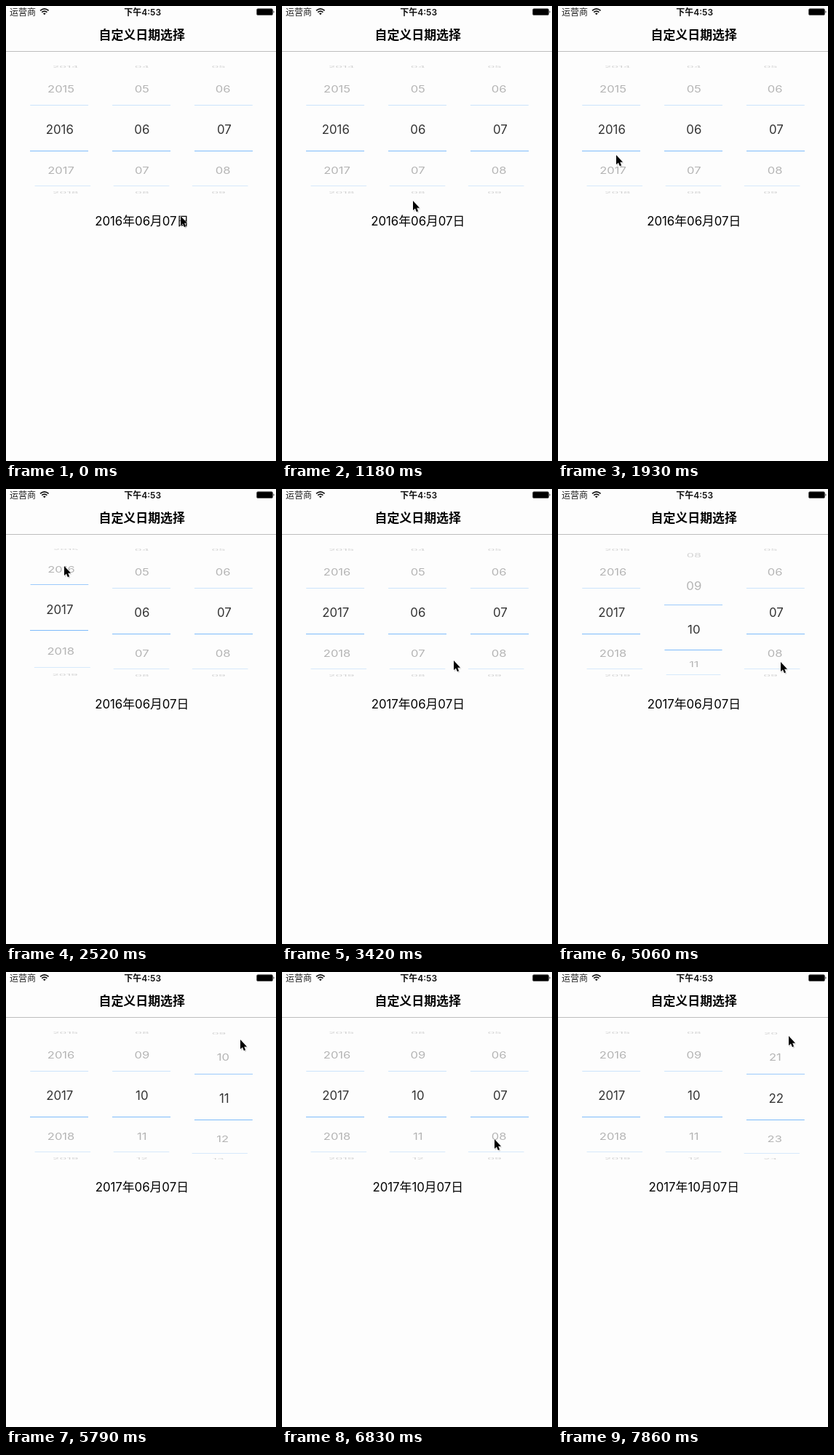
An HTML page that plays this animation: 371x626 px, repeating every 8 s.

```html
<!DOCTYPE html>
<html lang="zh-CN">
<head>
<meta charset="utf-8">
<title>自定义日期选择</title>
<style>
  html, body { margin: 0; width: 100%; height: 100%; overflow: hidden; background: #fdfdfd; }
  svg { display: block; width: 371px; height: 626px; }
  text { font-family: Inter, "Noto Sans CJK SC", "Noto Sans CJK", sans-serif; text-anchor: middle; }
</style>
</head>
<body>
<svg viewBox="0 0 371 626">
  <defs><clipPath id="wheelClip"><rect x="0" y="82" width="371" height="176"/></clipPath></defs>
  <rect width="371" height="626" fill="#fdfdfd"/>

  <text x="23" y="12.5" font-size="12" fill="#222">运营商</text>
  <g fill="none" stroke="#111" stroke-width="1.7">
    <path d="M47 6.3Q52.8 1.3 58.6 6.3"/>
    <path d="M49.2 8.7Q52.8 5.6 56.4 8.7"/>
  </g>
  <path d="M50.9 10.2Q52.8 8.7 54.7 10.2L52.8 12.3Z" fill="#111"/>
  <text x="187.7" y="12.5" font-size="12" font-weight="600" fill="#111">下午4:53</text>
  <rect x="344.5" y="3.800" width="22" height="8.700" rx="1.6" fill="#000" stroke="#555" stroke-width=".8"/>
  <path d="M367.500 6.2Q369.500 8 367.500 9.8Z" fill="#111"/>

  <text x="186.7" y="46.3" font-size="16.9" font-weight="700" fill="#000">自定义日期选择</text>
  <rect y="62" width="371" height="1" fill="#bdbdbd"/>

  <g id="wheels" clip-path="url(#wheelClip)"></g>
  <text id="date" x="186.8" y="302" font-size="16.8" fill="#000"></text>

  <g id="cursor">
    <path d="M1 2V15.500L4.200 12.500 6 17 8.500 16 6.800 11.500H10.500Z" fill="#000" opacity=".15"/>
    <path d="M0 0V13L3 10.400 4.900 15.200 7 14.300 5.200 9.700H9Z" fill="#000"
          stroke="#fff" stroke-width="1" paint-order="stroke"/>
  </g>
</svg>
<script>
const LOOP = 8000, STEP = 148.3, LAST = 53;
const MID_X = 186, MID_Y = 170, RADIUS = 87.5;
const YEAR_SET = 20, MONTH_SET = 41;

const clamp = t => Math.min(1, Math.max(0, t));
const smooth = t => t * t * (3 - 2 * t);
const glide = t => 1 - (1 - t) ** 2.3;
const spring = t => 1 + 2.5 * (t - 1) ** 3 + 1.5 * (t - 1) ** 2;

// A flick turns a wheel by some rows between two steps
const columns = [
  { x: 73, first: 2016, flicks: [{ from: 14, to: 19, rows: 1, ease: spring }] },
  { x: 186, first: 6, flicks: [{ from: 25, to: 39, rows: 4, ease: glide }] },
  { x: 299, first: 7, flicks: [
    { from: 34, to: 39.4, rows: 4, ease: smooth, reset: MONTH_SET },
    { from: 46, to: 53.28, rows: 15, ease: smooth }
  ] }
];

// Turning points of the pointer: step, x, y
const stops = [
  [0, 240, 289], [4, 214, 254], [8, 180, 268], [10, 134, 304], [13, 80, 205],
  [17, 80, 106], [23, 236, 236], [25, 236, 236], [29, 237, 114], [33, 304, 236],
  [34, 306, 238], [39, 322, 93], [46, 292, 230], [49, 309, 78], [53, 317, 88]
];

const $ = id => document.getElementById(id);
const pad = n => String(n).padStart(2, "0");

function pointerAt(step) {
  const n = Math.max(1, stops.findIndex(s => s[0] >= step));
  const [t0, x0, y0] = stops[n - 1], [t1, x1, y1] = stops[n];
  const e = smooth((step - t0) / (t1 - t0));
  return [x0 + (x1 - x0) * e, y0 + (y1 - y0) * e];
}

function wheelAt(flicks, step) {
  const flick = flicks.findLast(f => step >= f.from);
  if (!flick || step >= flick.reset) return 0;
  return flick.rows * flick.ease(clamp((step - flick.from) / (flick.to - flick.from)));
}

// Projects an angle on the wheel to screen height, squash and perspective
function project(deg, x) {
  const a = deg * Math.PI / 180, squash = Math.cos(a);
  const scale = 1 - .09 * Math.max(0, .94 - squash);
  return { x: MID_X + (x - MID_X) * scale, y: MID_Y + RADIUS * Math.sin(a), squash, scale };
}

function lineColor(r, moving) {
  if (r > .5) return "#d6e9fb";
  if (r > -.5) return "#7dbbfa";
  return moving ? "#9ccafb" : "#cbe4fb";
}

function drawRow(col, row, pos) {
  const r = row - pos, deg = 40 * r, lineDeg = 42.5 * r + 19.9;
  let out = "";
  if (Math.abs(deg) < 88) {
    const p = project(deg, col.x);
    const fill = ["#333", "#b4b4b4", "#d2d2d2"][Math.min(2, Math.round(Math.abs(r)))];
    out += `<text transform="translate(${p.x + .8} ${p.y + .3}) scale(${p.scale} ${p.squash})"
      y="6.1" font-size="16.8" fill="${fill}">${pad(col.first + row)}</text>`;
  }
  if (r > -1.5 && lineDeg < 80) {
    const p = project(lineDeg, col.x), half = 40 * p.scale;
    out += `<rect x="${p.x - half}" y="${Math.round(p.y - .5)}"
      width="${2 * half}" height="1" fill="${lineColor(r, pos % 1 !== 0)}"/>`;
  }
  return out;
}

function drawColumn(col, step) {
  const pos = wheelAt(col.flicks, step), near = Math.round(pos);
  let out = "";
  for (let row = near - 3; row <= near + 3; row++) out += drawRow(col, row, pos);
  return out;
}

function draw(step) {
  $("wheels").innerHTML = columns.map(c => drawColumn(c, step)).join("");
  $("date").textContent =
    `${step < YEAR_SET ? 2016 : 2017}年${step < MONTH_SET ? "06" : "10"}月07日`;
  $("cursor").setAttribute("transform", `translate(${pointerAt(step)})`);
}

let shown = -1;
function tick() {
  const step = Math.min(LAST, Math.floor((performance.now() % LOOP + 8) / STEP));
  if (step !== shown) draw(shown = step);
  requestAnimationFrame(tick);
}
tick();
</script>
</body>
</html>
```
